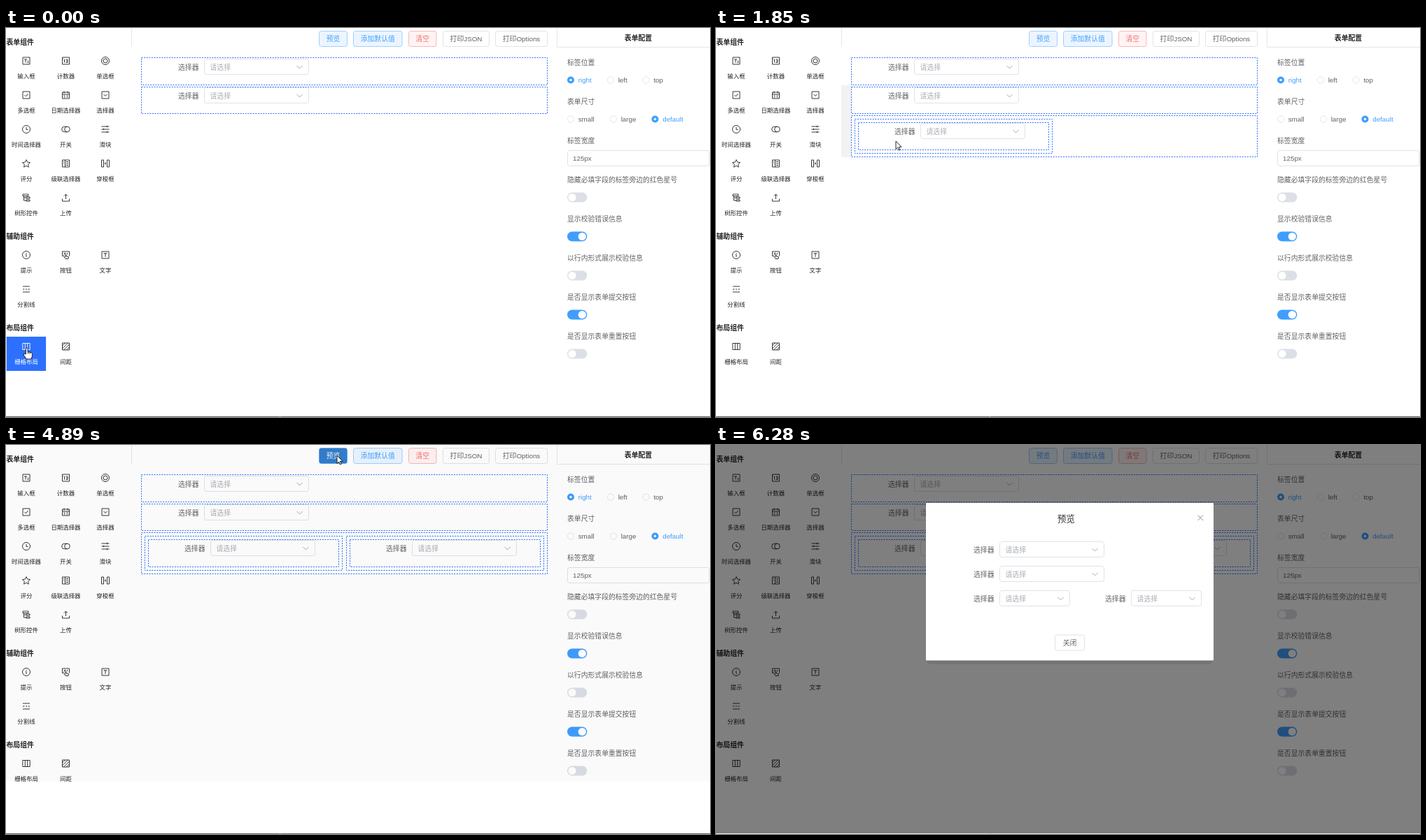
An HTML page for the animation above (6380 ms loop, 1006 px wide and 557 px high).

```html
<!DOCTYPE html>
<html lang="zh-CN">
<head>
<meta charset="utf-8">
<title>表单设计器</title>
<style>
html, body { margin: 0; width: 100%; height: 100%; overflow: hidden; background: #fff; }
svg { display: block; font-family: "Liberation Sans", Arial, "Noto Sans CJK SC", "Noto Sans CJK", sans-serif; }
</style>
</head>
<body>
<svg id="stage" width="1006" height="557" viewBox="0 0 1006 557"></svg>
<script>
const LOOP = 6380, BLUE = '#409eff', DEEP = '#2d70ff', LINE = '#dfe2e8', GREY = '#606266', INK = '#222';
const $ = id => document.getElementById(id);

// Markup helpers
const text = (x, y, s, fill = GREY, size = 9.84, more = '') =>
  `<text x="${x}" y="${y + size * .37}" font-size="${size}" fill="${fill}" ${more}>${s}</text>`;
const mid = (x, y, s, fill, size, more = '') => text(x, y, s, fill, size, 'text-anchor="middle" ' + more);
const rect = (x, y, w, h, fill = 'none', stroke = 'none', rx = 0, more = '') =>
  `<rect x="${x}" y="${y}" width="${w}" height="${h}" fill="${fill}" stroke="${stroke}" rx="${rx}" ${more}/>`;
const path = (d, stroke, more = '') => `<path d="${d}" fill="none" stroke="${stroke}" ${more}/>`;
const disc = (x, y, r, fill, stroke = 'none', w = 1) =>
  `<circle cx="${x}" cy="${y}" r="${r}" fill="${fill}" stroke="${stroke}" stroke-width="${w}"/>`;
const group = (id, body, more = '') => `<g id="${id}" ${more}>${body}</g>`;
const dashed = (x, y, w, h) => rect(x, y, w, h, 'none', DEEP, 0, 'stroke-dasharray="2 1.6"');
const button = (x, w, y, label, fill, border, color) =>
  rect(x, y, w, 22, fill, border, 3) + mid(x + w / 2, y + 11, label, color);
const field = (x, y, w = 149) =>
  text(x - 8, y, '选择器', GREY, 9.84, 'text-anchor="end"') + rect(x, y - 11.5, w, 22, '#fff', LINE, 3) +
  text(x + 8, y, '请选择', '#a8abb2') + path(`M${x + w - 17} ${y - 2}l4 4 4-4`, '#a8abb2');

// Sidebar: icons live in a 12 x 12 box
const frame = 'M1 1h10v10h-10z', ring = 'M.5 6a5.5 5.5 0 1 0 11 0a5.5 5.5 0 1 0-11 0';
const sections = [
  ['表单组件', 33, [
    ['输入框', frame + 'M3 4h4M5 4v4.5M7.5 6.5h2M7.5 8.5h2'],
    ['计数器', frame + 'M3 4h1v4.5M6 4h2.5v4.5h-2.5M6.5 6.3h2M1 3h1'],
    ['单选框', ring + 'M3 6a3 3 0 1 0 6 0a3 3 0 1 0-6 0'],
    ['多选框', frame + 'M3.5 6l2 2 3-4'],
    ['日期选择器', 'M1 2h10v9h-10zM1 5h10M3.5 .5v3M8.5 .5v3M3 7h2M7 7h2M3 9h2M7 9h2'],
    ['选择器', frame + 'M3.5 4.8l2.5 2.7 2.5-2.7'],
    ['时间选择器', ring + 'M6 3v3.5h2.5'],
    ['开关', 'M4 2.2h4a3.8 3.8 0 0 1 0 7.6h-4a3.8 3.8 0 0 1 0-7.6zM8 2.2a3.8 3.8 0 0 0 0 7.6'],
    ['滑块', 'M.5 2h11M.5 6h11M.5 10h11M8.5 .8v2.4M3.5 4.8v2.4M8.5 8.8v2.4'],
    ['评分', 'M6 .6l1.7 3.5 3.8.5-2.8 2.7.7 3.9-3.4-1.9-3.4 1.9.7-3.9-2.8-2.7 3.8-.5z'],
    ['级联选择器', frame + 'M5 1v10M2.5 3.5h1M2.5 6h1M6.5 3.5h3M6.5 6h3M6.5 8.5h3'],
    ['穿梭框', 'M.5 1h3v10h-3zM8.5 1h3v10h-3zM5 6h2M6 4.5v3'],
    ['树形控件', 'M1 1h8v2.5h-8zM6 5h5v2h-5zM6 9h5v2h-5zM2.5 3.5v6.5h3.5M2.5 6h3.5'],
    ['上传', 'M6 1v7M3.5 3.5l2.5-2.5 2.5 2.5M1 7.5v3.5h10v-3.5']]],
  ['辅助组件', 311, [
    ['提示', ring + 'M6 3v1.2M5 5.5h1v3.5'],
    ['按钮', 'M4 7.5h-3v-6.5h10v6.5M3.2 6l1.6-3.2 1.5 3.2M8 3v2M5.5 11.5l-1.5-2.5 1.5-.5v-2h1.2v1.5l3.3.8-.5 2.7z'],
    ['文字', frame + 'M3.5 3.8h5M6 3.8v5'],
    ['分割线', 'M1 2h10M1 6h2.5M5 6h2M8.5 6h2.5M1 10h10']]],
  ['布局组件', 442, [
    ['栅格布局', 'M.8 1.5h10.4v9h-10.4zM4.3 1.5v9M7.7 1.5v9'],
    ['间距', frame + 'M1 5l4-4M1 9l8-8M3 11l8-8M7 11l4-4']]]];

let itemId = 0;
const tile = (label, icon, color) =>
  `<g transform="translate(22.3 8)">${path(icon, color, 'stroke-width=".9"')}</g>` + mid(28.3, 36, label, color, 8.44);
const sidebar = sections.map(([title, top, items]) =>
  text(.5, top - 12.5, title, INK, 9.84, 'font-weight="700"') +
  items.map(([label, icon], i) =>
    `<g transform="translate(${.7 + i % 3 * 56.5} ${top + Math.floor(i / 3) * 49})">` + tile(label, icon, INK) +
    group('item' + itemId++, rect(.1, 0, 56.3, 49, DEEP) + tile(label, icon, '#fff'), 'opacity="0"') + '</g>').join('')
).join('');

// Right panel
const radio = (x, y, label, on) =>
  (on ? disc(x, y, 5, BLUE) + disc(x, y, 1.7, '#fff') : disc(x, y, 4.6, '#fff', '#e4e7ed')) +
  text(x + 10.7, y, label, on ? BLUE : GREY);
const toggle = (y, on) => rect(802, y - 7, 28.3, 14, on ? BLUE : '#dcdfe6', 'none', 7) + disc(on ? 823.3 : 809, y, 5.6, '#fff');
const slider = (y, value) =>
  rect(802, y - 2, 204, 4, '#e4e7ed', 'none', 2) + rect(802, y - 2, value, 4, BLUE, 'none', 2) +
  disc(802 + value, y, 6.3, '#fff', BLUE, 1.5);

const formPanel = mid(903.5, 14, '表单配置', INK, 9.84, 'font-weight="700"') +
  ['标签位置', '表单尺寸', '标签宽度', '隐藏必填字段的标签旁边的红色星号', '显示校验错误信息',
    '以行内形式展示校验信息', '是否显示表单提交按钮', '是否显示表单重置按钮']
    .map((s, i) => text(802, 49.5 + i * 56, s)).join('') +
  radio(807, 74.5, 'right', true) + radio(864, 74.5, 'left') + radio(914.7, 74.5, 'top') +
  radio(807, 130.5, 'small') + radio(868, 130.5, 'large') + radio(927.5, 130.5, 'default', true) +
  rect(802.5, 175.5, 202.5, 22, '#fff', LINE, 3) + text(810, 186.5, '125px') +
  [0, 1, 0, 1, 0].map((on, i) => toggle(242.5 + i * 56, on)).join('');

const partPanel = mid(846, 14, '组件配置', BLUE, 9.84, 'font-weight="700"') +
  mid(961, 14, '表单配置', INK, 9.84, 'font-weight="700"') + rect(788, 26.3, 116, 1.5, BLUE) +
  path('M802 45.5H870M938 45.5H1006', LINE) + mid(904, 45.5, '属性配置', '#303133') +
  ['栅格占据的列数', '栅格左侧的间隔格数', '栅格向右移动格数', '栅格向左移动格数']
    .map((s, i) => text(802, 70.5 + i * 56, s) + slider(95.5 + i * 56, i ? 0 : 102)).join('');

// Middle area
const row = (y, h) => dashed(193.5, y, 580, h);
const cell = x => dashed(x, 130.5, 282, 49) + dashed(x + 5, 135.5, 272, 39) + field(x + 94, 148);
const picked = rect(198, 130.5, 283, 49.5, 'none', DEEP, 0, 'stroke-width="2"') +
  [DEEP, DEEP, '#f5222d'].map((c, i) => rect(438 + i * 14, 165, 13, 13, c)).join('') +
  disc(444.5, 171.5, 3, '#fff') + disc(444.5, 171.5, 1.1, DEEP) +
  rect(455, 168.5, 5, 5, '#fff') + path('M457 175h5v-5', '#fff') +
  path('M469 169.5h7M471 168h3M470 171v4h5v-4M472.5 171v4', '#fff');

const dialog = group('shade', rect(301, 296, 409, 18, '#000', 'none', 6, 'opacity=".09"')) +
  rect(300, 83, 411, 225.5, '#fff', 'none', 1) + mid(500.3, 105, '预览', '#303133', 12.65) +
  path('M688.5 100.5l7.5 7.5M696 100.5l-7.5 7.5', '#909399') +
  field(405.5, 150) + field(405.5, 185) + field(405.5, 220, 100) + field(593.5, 220, 100) +
  button(484.5, 42, 272, '关闭', '#fff', LINE, GREY);

const ARROW = 'M0 0V11.5L2.7 9l1.7 4 1.8-.8L4.5 8.3H8z';
const HAND = 'M-1.6 9V1.2a1.3 1.3 0 0 1 2.6 0V5.5l5 1.2q1.4.4 1.4 2V12l-1.4 4H-1L-4.8 10q-.6-1.8 1.2-1.6zM1.5 5.6v3M4 6.2v2.6';

$('stage').innerHTML =
  group('edges', '<rect id="strip" x="179" width="14" fill="#f2f2f2"/>' +
    group('margin', rect(197, 28, 591, 14, '#f2f2f2') + rect(774, 28, 14, 446, '#f2f2f2'))) +
  path('M179.5 0V27M787.5 0V27.5H1006', '#e6e6e6') + sidebar +
  button(447.5, 40, 4.5, '预览', '#ecf5ff', '#a0cfff', BLUE) +
  group('pressed', rect(447.5, 4.5, 40, 22, BLUE, 'none', 3, 'id="press"') + mid(467.5, 15.5, '预览', '#fff')) +
  button(496.5, 69.5, 4.5, '添加默认值', '#ecf5ff', '#a0cfff', BLUE) +
  button(575.5, 39.5, 4.5, '清空', '#fff3f3', '#fab6b6', '#f56c6c') +
  button(624.5, 66, 4.5, '打印JSON', '#fff', LINE, GREY) +
  button(699.5, 74, 4.5, '打印Options', '#fff', LINE, GREY) +
  row(42.5, 39) + field(283.5, 56) + row(84.5, 38) + field(283.5, 97) +
  group('empty', row(125.5, 55) + dashed(198.5, 130.5, 282, 46)) +
  group('filled', row(125.5, 59) + cell(198.5)) +
  group('copied', cell(486.5)) + group('picked', picked) +
  group('formPanel', formPanel) + group('partPanel', partPanel) +
  group('veil', rect(0, 0, 1006, 557, '#000', 'none', 0, 'id="dim" opacity=".5"') + group('dialog', dialog)) +
  rect(0, 556, 1006, 1, '#666', 'none', 0, 'id="base"') + rect(391, 556, 1, 1, '#bbb') +
  '<path id="cursor" fill="#fff" stroke="#111" stroke-width=".9" stroke-linejoin="round"/>';

// Timeline: time, x, y of the pointer
const moves = [
  [0, 30, 458], [80, 30, 458], [200, 60, 400], [400, 150, 250], [620, 210, 162], [770, 210, 162],
  [830, 165, 158], [1040, 153, 132], [1070, 151, 125], [1340, 147, 115], [1400, 147, 115], [1480, 257, 162],
  [2130, 257, 162], [2280, 555, 161], [2490, 555, 161], [2640, 165, 172], [2720, 200, 193], [2880, 478, 164],
  [3310, 478, 164], [3370, 479, 170], [3560, 458, 169], [3980, 458, 169], [4100, 460, 215], [4560, 473, 15],
  [4900, 473, 15], [5010, 480, 48], [5220, 698, 206], [5280, 698, 206], [5750, 945, 560], [LOOP, 945, 560]];
// time, top, height
const strips = [[0, 156, 0], [830, 156, 17], [1420, 82, 98], [1850, 82, 103], [2640, 82, 125]];
// item, hover start, hover end, fade-out time
const hovers = [[18, -999, 560, 120], [8, 800, 1060, 150], [5, 1060, 1849, 1], [8, 2620, 2720, 150]];

const clamp = v => Math.max(0, Math.min(1, v));
const within = (t, a, b) => t >= a && t < b;
const show = (id, on) => $(id).style.display = on ? '' : 'none';
const set = (id, attrs) => { for (const k in attrs) $(id).setAttribute(k, attrs[k]); };

function draw(t) {
  for (const [id] of hovers) set('item' + id, { opacity: 0 });
  for (const [id, start, end, out] of hovers) {
    const a = clamp((t - start) / 150) - clamp((t - end) / out);
    if (a > 0) set('item' + id, { opacity: a });
  }

  const [, y, height] = strips.filter(s => s[0] <= t).pop();
  set('strip', { y, height });
  show('edges', t < 4620);
  show('margin', t >= 3370);
  show('empty', within(t, 560, 1850));
  show('filled', t >= 1850);
  show('copied', t >= 3700);
  const selected = within(t, 3370, 4100);
  show('picked', selected);
  show('partPanel', selected);
  show('formPanel', !selected);
  show('pressed', within(t, 4500, 4960));
  set('press', { fill: t < 4750 ? BLUE : '#337ecc' });

  const p = 1 - (1 - clamp((t - 4887) / 300)) ** 3;
  set('veil', { opacity: p });
  set('dim', { height: t < 4950 ? 482 : 557 });
  set('dialog', { opacity: p, transform: `translate(0 ${-14 * (1 - p)})` });
  show('shade', t >= 5200);
  set('base', { fill: t < 6280 ? '#666' : '#eee' });

  const i = moves.findIndex(m => m[0] > t), a = moves[i - 1], b = moves[i];
  const k = (t - a[0]) / (b[0] - a[0]), x = a[1] + (b[1] - a[1]) * k;
  const hand = x < 172 || within(t, 3100, 3980) || within(t, 4500, 4750);
  set('cursor', { d: hand ? HAND : ARROW, transform: `translate(${x} ${a[2] + (b[2] - a[2]) * k})` });
}

function tick() {
  draw(performance.now() % LOOP);
  requestAnimationFrame(tick);
}
tick();
</script>
</body>
</html>
```
